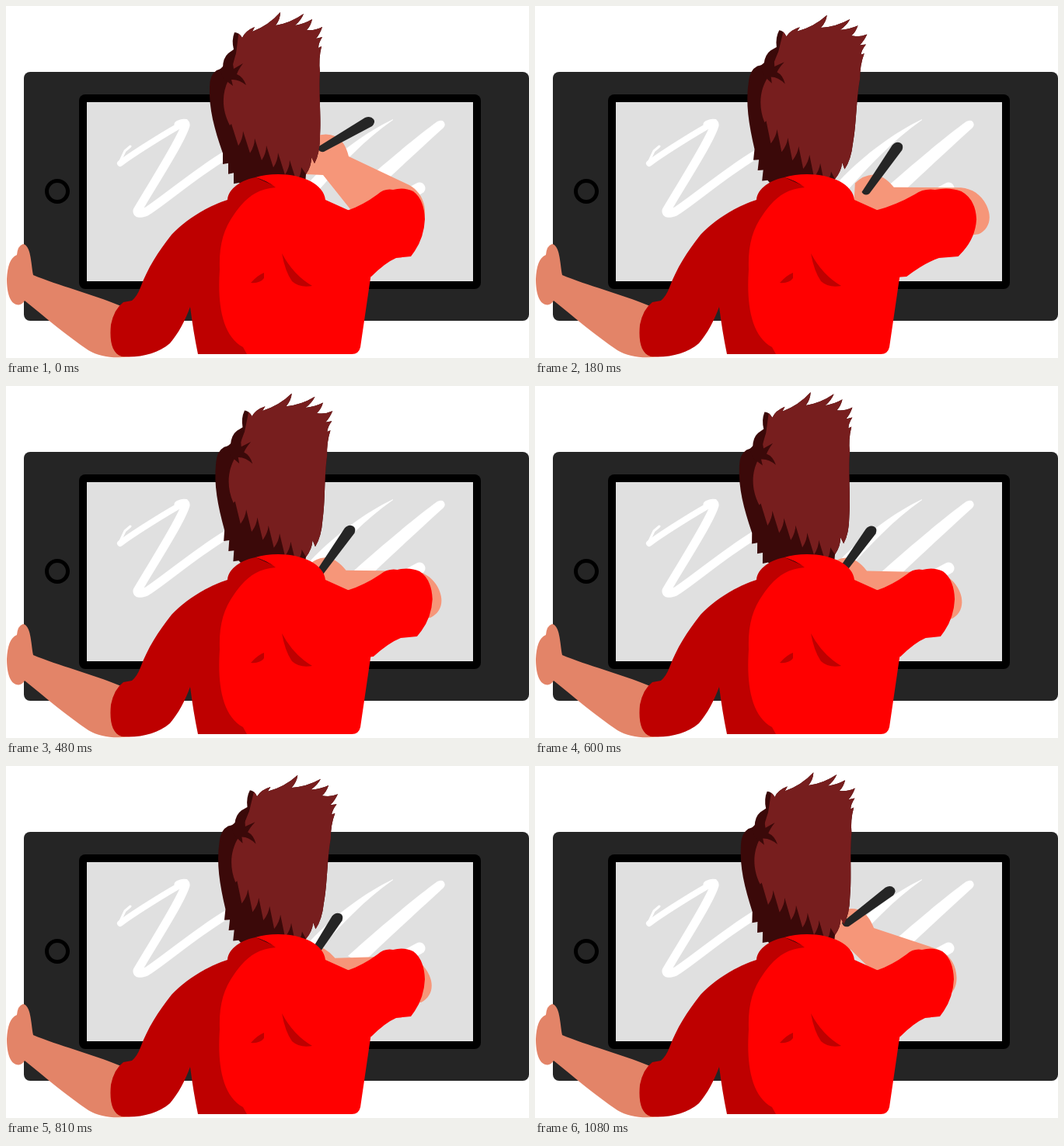
An HTML page for the animation above (1110 ms loop, 673x454 px).

```html
<!DOCTYPE html>
<html lang="en">
<head>
<meta charset="utf-8">
<title>Drawing on a tablet</title>
<style>
  html, body { margin: 0; width: 100%; height: 100%; overflow: hidden; background: #fff; }
  svg { display: block; width: 673px; height: 454px; }
  .ink { fill: none; stroke: #fff; stroke-linecap: round; stroke-linejoin: round; }
</style>
</head>
<body>
<svg viewBox="0 0 673 454">
  <!-- tablet -->
  <rect x="23" y="85" width="650" height="321" rx="8" fill="#252525"/>
  <rect x="94" y="114" width="517" height="251" rx="8"/>
  <rect x="104" y="124" width="497" height="231" fill="#e0e0e0"/>
  <circle cx="66" cy="239" r="13.5" fill="none" stroke="#000" stroke-width="5"/>

  <!-- marks on the screen -->
  <path class="ink" stroke-width="3" d="M146 202L153 187L160 181"/>
  <path class="ink" stroke-width="8" d="M147 203C158 194 205 164 231 150"/>
  <path class="ink" stroke-width="11" d="M222 153Q232 149 231 154C224 176 188 231 169 264Q168 270 181 265C210 246 242 217 285 191"/>
  <path fill="#fff" d="M498 146C465 162 425 190 392 225L402 238C430 206 462 172 498 147Z"/>
  <path fill="#fff" d="M555 149C530 167 482 207 440 245L458 255C486 228 530 187 563 157Q567 152 562 148Q559 147 555 149Z"/>
  <path class="ink" stroke-width="15" d="M475 266L532 235"/>

  <!-- resting forearm -->
  <path fill="#e38468" d="M22 307C32 309 32 330 35 347C66 360 112 372 148 387L160 452C141 455 121 453 106 444C78 425 51 402 24 380Q20 387 13 385C4 382 1 367 1 352C2 336 5 325 14 321Q15 309 22 307Z"/>

  <!-- drawing forearm and pen -->
  <g id="arm">
    <path fill="#f69679" d="M398 168Q412 163 424 168Q436 174 441 194L519 231C533 239 540 253 539 269C538 285 528 295 514 295Q470 282 443 262L408 218L386 217Q381 200 390 183Z"/>
    <path fill="#252525" d="M401 182Q402 189 409 188L471 155Q476 150 473 146Q469 141 462 144Z"/>
  </g>

  <g id="head">
    <clipPath id="outline"><path id="shape"/></clipPath>
    <use href="#shape" fill="#3b0909"/>
    <path id="light" fill="#771e1e" clip-path="url(#outline)"/>
    <path fill="#3b0909" d="M296 61Q290 69 293 81L305 74Q299 82 297 88Q305 91 309 102Q299 94 290 95L292 103L280 94L275 82Z"/>
  </g>

  <!-- shirt: shaded side, lit side, right sleeve, folds -->
  <path fill="#be0000" d="M285 250C286 235 304 224 321 221L350 234L330 449H247Q241 420 237 388C230 407 222 422 211 435C195 449 171 454 149 452C136 448 133 431 135 411Q139 391 151 382L162 380Q169 374 173 363C183 337 195 318 213 295C231 276 257 259 285 250Z"/>
  <path fill="#f00" d="M321 221Q336 225 347 234C320 236 306 251 294 268C279 289 274 310 275 340C272 385 278 425 305 440L310 449H445Q454 449 456 440L469 351L480 300L442 264L411 250C409 230 382 217 350 217Q334 217 321 221Z"/>
  <path id="sleeve" fill="#f00" d="M436 265Q458 258 478 243Q487 235 498 237Q512 233 524 239Q538 249 539 275Q538 298 526 316L521 323L502 325Q488 331 470 349L436 352Z"/>
  <path fill="#be0000" d="M332 344Q324 347 315 357Q327 358 332 351ZM355 319Q370 347 394 361Q378 364 368 355Q359 342 355 319Z"/>
</svg>
<script>
  const LOOP = 1110, STEP = 30;
  const part = id => document.getElementById(id);

  // Row of n locks between two points, each tip set off by dx, dy.
  function locks(x0, y0, x1, y1, n, dx, dy) {
    let d = `L${x0} ${y0}`;
    for (let i = 1; i <= n; i++) {
      const x = x0 + (x1 - x0) * i / n, y = y0 + (y1 - y0) * i / n;
      d += `L${x + dx} ${y + dy}Q${x} ${y + dy / 2} ${x} ${y}`;
    }
    return d;
  }

  const crown = 'M279 80Q279 67 286 61L293 56Q290 44 294 34Q300 34 304 41Q308 32 320 27L317 33Q338 25 353 8Q353 17 347 25Q366 22 383 10Q380 18 372 25Q384 23 394 17Q392 26 387 31Q398 32 407 27Q404 36 399 42L407 40Q402 48 402 54L406 52Q402 68 404 85';
  const nape = 'C402 110 406 145 404 168Q404 190 397 203L393 195Q393 207 386 217L384 242H315';
  shape.setAttribute('d', crown + nape + locks(300, 228, 279, 190, 3, 0, 14) + 'C268 158 261 133 262 104Q262 89 271 83Z');
  light.setAttribute('d', 'M410 0H304L296 61L286 96C278 112 277 133 288 154' + locks(290, 152, 380, 208, 6, -6, 19) + 'L386 217L410 210Z');

  const ramp = (t, a, b) => Math.min(1, Math.max(0, (t - a) / (b - a)));
  const swing = (t, a, peak, b) => Math.min(ramp(t, a, peak), 1 - ramp(t, peak, b));

  function place(el, x, y, turn, px, py) {
    el.setAttribute('transform', `translate(${x} ${y}) rotate(${turn} ${px} ${py})`);
  }

  function draw(now) {
    const t = Math.floor((now % LOOP) / STEP) * STEP;

    // The head leans right twice, the second time a little less.
    const lean = 9.8 * swing(t, 0, 285, 615) + 8.1 * swing(t, 615, 875, 1125);
    place(part('head'), 3.65 * lean, 0.1 * lean * lean, lean, 353, 9);

    // The hand drops, slides left, sinks, then lifts back.
    const drop = ramp(t, 0, 190), slide = ramp(t, 190, 615);
    const sink = ramp(t, 615, 810), hold = 1 - ramp(t, 980, 1115);
    place(part('arm'),
      hold * (-drop - 35 * slide - 5 * sink),
      hold * (34 * drop + 3 * slide + 9 * sink),
      hold * (-26.5 * drop + 2.5 * slide - 3 * sink), 469, 149);

    const stretch = 1 + 0.32 * (drop - slide);
    part('sleeve').setAttribute('transform', `translate(443 0) scale(${stretch} 1) translate(-443 0)`);
  }

  const start = performance.now();
  function tick() {
    draw(performance.now() - start);
    requestAnimationFrame(tick);
  }
  tick();
</script>
</body>
</html>
```
